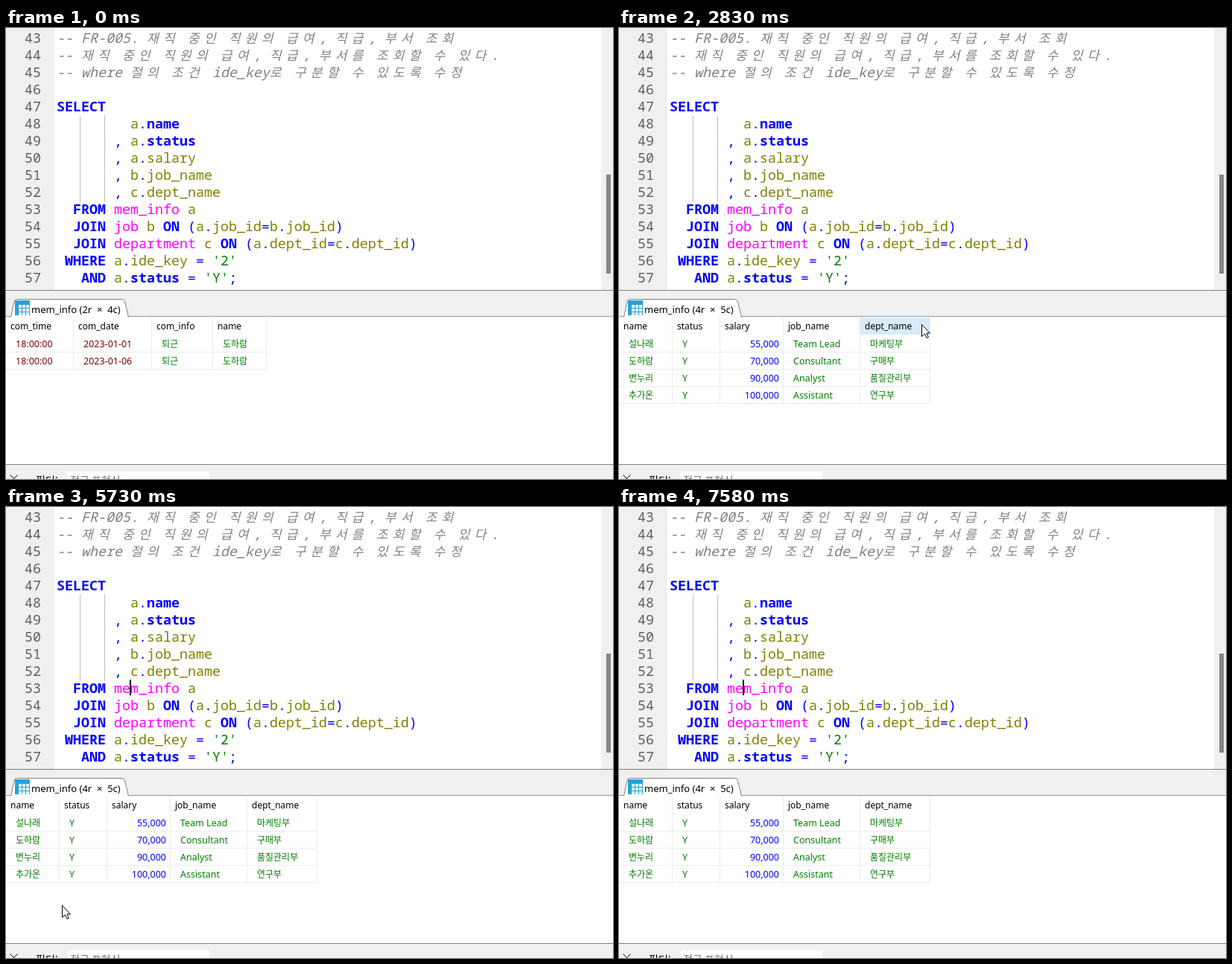
Write an HTML page with a canvas that moves like this. It is 815x606 px and loops after 8000 ms.

```html
<!DOCTYPE html>
<html lang="ko">
<head>
<meta charset="utf-8">
<style>
html, body { margin: 0; width: 100%; height: 100%; overflow: hidden; background: #fff; }
canvas { display: block; }
</style>
</head>
<body>
<canvas id="stage" width="815" height="606"></canvas>
<script>
const ctx = document.getElementById('stage').getContext('2d');
const LOOP = 8000, CHAR = 11, ROW = 23, CODE_X = 68, SPLIT = 352, HEAD_Y = 389;
const HANGUL = /[\uac00-\ud7a3]/;
const MONO = '18.33px "Noto Sans Mono", "DejaVu Sans Mono", monospace';
const CJK = '"Noto Sans CJK KR", "Noto Sans CJK", sans-serif';
const UI = '"Noto Sans", "Open Sans", ' + CJK;
const BLUE = '#0000ff', GREEN = '#008000', MAROON = '#800000', GRAY = '#808080', PANEL = '#f0f0f0';

const code = `-- FR-005. 재직 중인 직원의 급여, 직급, 부서 조회
-- 재직 중인 직원의 급여, 직급, 부서를 조회할 수 있다.
-- where 절의 조건 ide_key로 구분할 수 있도록 수정

SELECT
         a.name
       , a.status
       , a.salary
       , b.job_name
       , c.dept_name
  FROM mem_info a
  JOIN job b ON (a.job_id=b.job_id)
  JOIN department c ON (a.dept_id=c.dept_id)
 WHERE a.ide_key = '2'
   AND a.status = 'Y';`.split('\n');

const column = (head, width, color, ...cells) => ({ head, width, color, cells });

const attendance = [
  column('com_time', 91, MAROON, '18:00:00', '18:00:00'),
  column('com_date', 105, MAROON, '2023-01-01', '2023-01-06'),
  column('com_info', 82, GREEN, '퇴근', '퇴근'),
  column('name', 72, GREEN, '도하람', '도하람')
];
const staff = [
  column('name', 72, GREEN, '설나래', '도하람', '변누리', '추가온'),
  column('status', 64, GREEN, 'Y', 'Y', 'Y', 'Y'),
  column('salary', 85, BLUE, '55,000', '70,000', '90,000', '100,000'),
  column('job_name', 103, GREEN, 'Team Lead', 'Consultant', 'Analyst', 'Assistant'),
  column('dept_name', 94, GREEN, '마케팅부', '구매부', '품질관리부', '연구부')
];

// The pointer eases from stop to stop and is hidden outside each path.
const stop = (at, x, y, wait = 70) => ({ at, x, y, leave: at + wait });
const queryPath = [
  stop(180, 686, 573), stop(790, 170, 241, 310), stop(1320, 203, 290), stop(1870, 400, 326),
  stop(2690, 406, 398, 210), stop(3530, 490, 440), stop(3930, 710, 556, 800), stop(5000, 760, 606)
];
const reviewPath = [
  stop(5330, 619, 560, 0), stop(5730, 75, 535), stop(6070, 12, 545), stop(6840, 50, 388),
  stop(7120, 663, 518)
];

function rect(x, y, w, h, color) {
  ctx.fillStyle = color;
  ctx.fillRect(x, y, w, h);
}

function text(str, x, y, font, color, align = 'left') {
  ctx.font = font;
  ctx.fillStyle = color;
  ctx.textAlign = align;
  ctx.fillText(str, x, y);
}

function shape(path, x, y, stroke, fill) {
  ctx.save();
  ctx.translate(x + 0.5, y + 0.5);
  const outline = new Path2D(path);
  if (fill) {
    ctx.fillStyle = fill;
    ctx.fill(outline);
  }
  ctx.strokeStyle = stroke;
  ctx.stroke(outline);
  ctx.restore();
}

function drawComment(line, y) {
  let x = CODE_X;
  for (const ch of line) {
    const wide = HANGUL.test(ch);
    text(ch, x, y, 'italic ' + (wide ? '17px ' + CJK : MONO), GRAY);
    x += wide ? 2 * CHAR : CHAR;
  }
}

function tokenStyle(token) {
  if (/^(SELECT|FROM|JOIN|ON|WHERE|AND|name|status)$/.test(token)) return ['bold ', BLUE];
  if (/^(mem_info|job|department)$/.test(token)) return ['', '#ff00ff'];
  if (token[0] === "'") return ['', GREEN];
  return ['', /\w/.test(token) ? '#808000' : BLUE];
}

function drawEditor() {
  rect(0, 0, 65, SPLIT, PANEL);
  rect(799, 0, 16, SPLIT, PANEL);
  rect(806, 197, 6, 133, '#858585');
  for (let y = 118; y < 233; y += 2)
    for (const x of [99, 132]) rect(x, y, 1, 1, GRAY);
  code.forEach((line, i) => {
    const y = 20 + i * ROW;
    text(43 + i, 25, y, MONO, '#606060');
    if (line.startsWith('--')) return drawComment(line, y);
    for (const match of line.matchAll(/'[^']*'|\w+|[^\s\w]/g)) {
      const [weight, color] = tokenStyle(match[0]);
      text(match[0], CODE_X + match.index * CHAR, y, weight + MONO, color);
    }
  });
}

function drawTab(columns) {
  rect(0, SPLIT, 815, 36, PANEL);
  rect(0, SPLIT, 815, 1, GRAY);
  rect(0, 387, 815, 1, '#989898');
  shape('M0 24L4.5 3Q5.5 0 8 0H149Q152 0 153 3L158 24', 6, 364, GRAY, '#fff');
  rect(12, 366, 20, 20, '#27a0da');
  for (let i = 0; i < 9; i++) rect(17 + i % 3 * 5, 372 + Math.floor(i / 3) * 5, 4, 4, '#f0f9fe');
  const title = `mem_info (${columns[0].cells.length}r  ×  ${columns.length}c)`;
  text(title, 34, 383, '13px ' + UI, '#000');
}

function drawTable(columns, pointer) {
  const rows = columns[0].cells.length;
  let left = -1;
  for (const { head, width, color, cells } of columns) {
    const right = left + width;
    const hovered = pointer && Math.abs(pointer.y - 399) < 13 &&
      pointer.x > left && pointer.x < right;
    if (hovered) rect(left + 1, HEAD_Y, width - 1, ROW, '#d9ebf9');
    rect(right, HEAD_Y, 1, (rows + 1) * ROW, '#ebebeb');
    text(head, left + 7, 405, '12px ' + UI, '#000');
    cells.forEach((cell, r) => {
      const font = HANGUL.test(cell) ? '12px ' + CJK : '12.5px ' + UI;
      const y = 429 + r * ROW;
      if (head === 'salary') text(cell, right - 5, y, font, color, 'right');
      else text(cell, left + 14, y, font, color);
    });
    left = right;
  }
  for (let r = 1; r <= rows; r++) rect(0, 412 + r * ROW, left + 1, 1, '#ebebeb');
}

function drawFilterBar() {
  rect(0, 586, 815, 20, PANEL);
  rect(0, 586, 815, 1, GRAY);
  rect(83, 596, 190, 10, '#fff');
  shape('M0 0L10 10M10 0L0 10', 5, 600, '#000');
  text('필터:', 40, 613, '14px ' + CJK, '#000');
  text('정규 표현식', 86, 613, '14px ' + CJK, '#707070');
}

function pointerAt(t) {
  const path = t < reviewPath[0].at ? queryPath : reviewPath;
  const i = path.findIndex(key => key.at > t);
  if (i < 1) return null;
  const from = path[i - 1], to = path[i];
  const k = Math.max(0, (t - from.leave) / (to.at - from.leave));
  const eased = 1 - (1 - k) ** 2;
  const mix = (a, b) => Math.round(a + (b - a) * eased);
  return { x: mix(from.x, to.x), y: mix(from.y, to.y) };
}

function drawPointer({ x, y }) {
  if (y < SPLIT) shape('M-3 -8H3M0 -8V8M-3 8H3', x, y, '#000');
  else shape('M0 0V16L4 12.5L6.5 18L9 17L6.5 11.5H11Z', x, y, '#000', '#fff');
}

function caretVisible(t) {
  const period = 1083, phase = (t - 4330 + 4 * period) % period;
  return t > 760 && t < 1250 || t > 2100 && phase < period / 2;
}

function draw(t) {
  const columns = t < 2200 ? attendance : staff;
  const pointer = pointerAt(t);
  rect(0, 0, 815, 606, '#fff');
  drawEditor();
  drawTab(columns);
  drawTable(columns, pointer);
  drawFilterBar();
  if (caretVisible(t)) rect(166, 232, 2, 21, '#000');
  if (pointer) drawPointer(pointer);
}

const start = performance.now();
function tick() {
  draw((performance.now() - start) % LOOP);
  requestAnimationFrame(tick);
}
tick();
</script>
</body>
</html>
```
